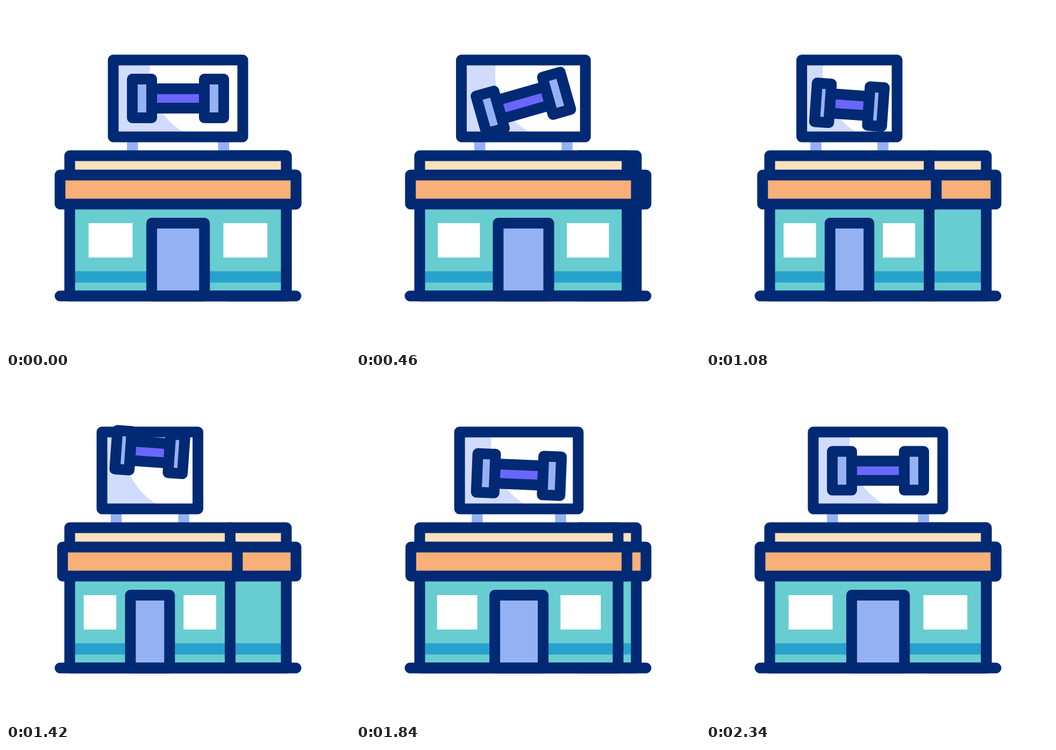
Recreate the animation shown at these times as an HTML page without scripts. Size 640 px wide and 640 px high, loop 2.4 s.

```html
<!DOCTYPE html>
<html lang="en">
<head>
<meta charset="utf-8">
<title>Gym</title>
<style>
  /* --k: width of the turning front, --y and --a: height and tilt of the dumbbell */
  @property --k { syntax: "<number>"; inherits: true; initial-value: 1; }
  @property --y { syntax: "<length>"; inherits: true; initial-value: 0px; }
  @property --a { syntax: "<angle>"; inherits: true; initial-value: 0deg; }

  html, body { margin: 0; width: 100%; height: 100%; overflow: hidden; background: #fff; }

  svg {
    display: block;
    width: 640px;
    height: 640px;
    animation: turn 2.4s cubic-bezier(.8, 0, .2, 1) infinite,
               toss 2.4s linear infinite,
               tilt 2.4s ease-in-out infinite;
  }
  svg * { vector-effect: non-scaling-stroke; }

  .ink { stroke: #022a74; stroke-width: 20; stroke-linejoin: round; stroke-linecap: round; }
  .leg { stroke: #94b2f3; stroke-width: 20.5; }
  .teal { fill: #67cdd1; }
  .stripe { fill: #27a2cd; }
  .cream { fill: #fde0be; }
  .orange { fill: #f7b077; }
  .blue { fill: #94b2f3; }
  .purple { fill: #6b66fb; }
  .pale { fill: #d1dcfd; }
  .white { fill: #fff; }
  .none { fill: none; }

  .front { transform: translateX(118.5px) scaleX(var(--k)) translateX(-118.5px); }
  .shine { transform: translateX(calc((var(--k) - 1) * 190px)); }
  .dumbbell {
    transform: translate(calc(118.5px + 201.5px * var(--k)), calc(172px + var(--y)))
               rotate(var(--a)) scaleX(var(--k));
  }

  @keyframes turn {
    0%, 99.2%, 100% { --k: 1; }
    50% { --k: .7345; }
  }
  @keyframes toss {
    0% { --y: 0px; animation-timing-function: ease-in-out; }
    18.8% { --y: 13px; animation-timing-function: cubic-bezier(.333, .667, .667, 1); }
    31.1% { --y: -63px; animation-timing-function: cubic-bezier(.333, 0, .667, .333); }
    44.6% { --y: 16px; animation-timing-function: cubic-bezier(.333, .667, .667, 1); }
    55.6% { --y: -39.5px; animation-timing-function: cubic-bezier(.333, 0, .667, .333); }
    66.7% { --y: 11px; }
    99.2%, 100% { --y: 0px; }
  }
  @keyframes tilt {
    0% { --a: 0deg; }
    18.6% { --a: -16deg; }
    31.5% { --a: 7.3deg; }
    44.6% { --a: 4deg; }
    68% { --a: 4deg; }
    87%, 100% { --a: 0deg; }
  }
</style>
</head>
<body>
<svg viewBox="0 0 640 640">
  <defs>
    <clipPath id="board">
      <rect class="front" x="199.5" y="100.5" width="241" height="143"/>
    </clipPath>
    <rect id="plate" x="-18" y="-36" width="36" height="72"/>
  </defs>

  <!-- side wall -->
  <rect class="teal" x="414" y="368" width="107.5" height="171"/>
  <rect class="stripe" x="414" y="493.5" width="107.5" height="21"/>
  <rect class="cream" x="414" y="278.5" width="107.5" height="36"/>
  <rect class="ink none" x="414" y="278.5" width="107.5" height="261"/>
  <rect class="ink orange" x="393" y="314.5" width="146.5" height="54"/>

  <!-- front wall -->
  <g class="front">
    <path class="leg" d="M235.3 243V279M404.8 243V279"/>
    <rect class="teal" x="118.5" y="368" width="403" height="171"/>
    <rect class="stripe" x="118.5" y="493.5" width="403" height="21"/>
    <rect class="cream" x="118.5" y="278.5" width="403" height="36"/>
    <rect class="ink none" x="118.5" y="278.5" width="403" height="261"/>
    <rect class="ink orange" x="100.5" y="314.5" width="439" height="54"/>
    <rect class="white" x="153.7" y="404" width="81.8" height="64"/>
    <rect class="white" x="404.5" y="404" width="81.8" height="64"/>
    <rect class="ink blue" x="271" y="404" width="98.3" height="135.5"/>
    <rect class="pale" x="199.5" y="100.5" width="241" height="143"/>
  </g>
  <path class="ink" d="M100.5 539.5H539.5"/>

  <!-- sign -->
  <g clip-path="url(#board)">
    <circle class="white shine" cx="394" cy="125" r="127"/>
  </g>
  <g class="front">
    <rect class="ink none" x="199.5" y="100.5" width="241" height="143"/>
  </g>

  <g class="dumbbell ink">
    <rect class="purple" x="-49" y="-18" width="98" height="36"/>
    <use href="#plate" class="blue" x="-67"/>
    <use href="#plate" class="blue" x="67"/>
  </g>
</svg>
</body>
</html>
```
